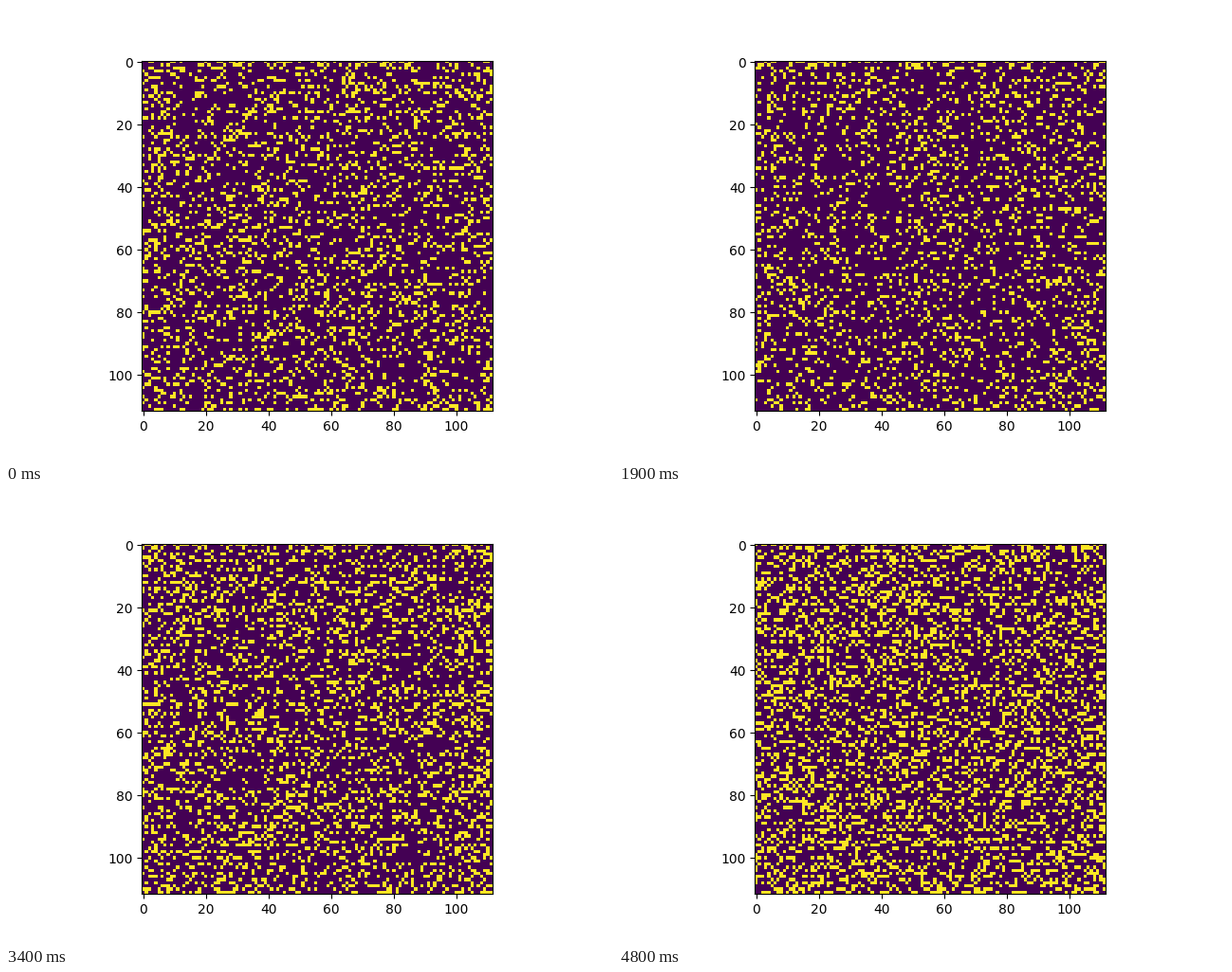
A matplotlib script for the animation above (4.9 s loop, 640 px wide and 480 px high).

```python
import numpy as np
import matplotlib.pyplot as plt
from matplotlib.animation import FuncAnimation

SIZE = 112
FRAMES = 49
INTERVAL = 100

# firing rate over time: (step, share of active cells)
RATE_STEPS = [0, 6, 14, 24, 28, 39, 48]
RATES = [0.21, 0.245, 0.125, 0.24, 0.26, 0.235, 0.295]


def edge_drive():
    """Cells near the border fire a little more often."""
    pos = np.arange(SIZE)
    dist = np.minimum(pos, SIZE - 1 - pos)
    side = 0.2 * np.exp(-dist / 6)
    rim = 0.3 * (dist == 0)
    return side[None, :] + (0.5 * side + rim)[:, None]


DRIVE = edge_drive()


def spikes(step):
    """Fire the strongest cells; each one dampens those above and below."""
    rng = np.random.default_rng(1000 + step)
    noise = rng.standard_normal((SIZE, SIZE))
    above_below = np.roll(noise, 1, axis=0) + np.roll(noise, -1, axis=0)
    rows = 0.08 * rng.standard_normal((SIZE, 1))
    field = noise - 0.12 * above_below + rows + DRIVE
    rate = np.interp(step, RATE_STEPS, RATES)
    return (field > np.quantile(field, 1 - rate)).astype(float)


fig, ax = plt.subplots(figsize=(6.4, 4.8), dpi=100)
image = ax.imshow(spikes(0), cmap="viridis", vmin=0, vmax=1)


def update(step):
    image.set_data(spikes(step))
    return [image]


anim = FuncAnimation(fig, update, frames=FRAMES, interval=INTERVAL,
                     repeat=True, repeat_delay=0, blit=False)
plt.show()
```
